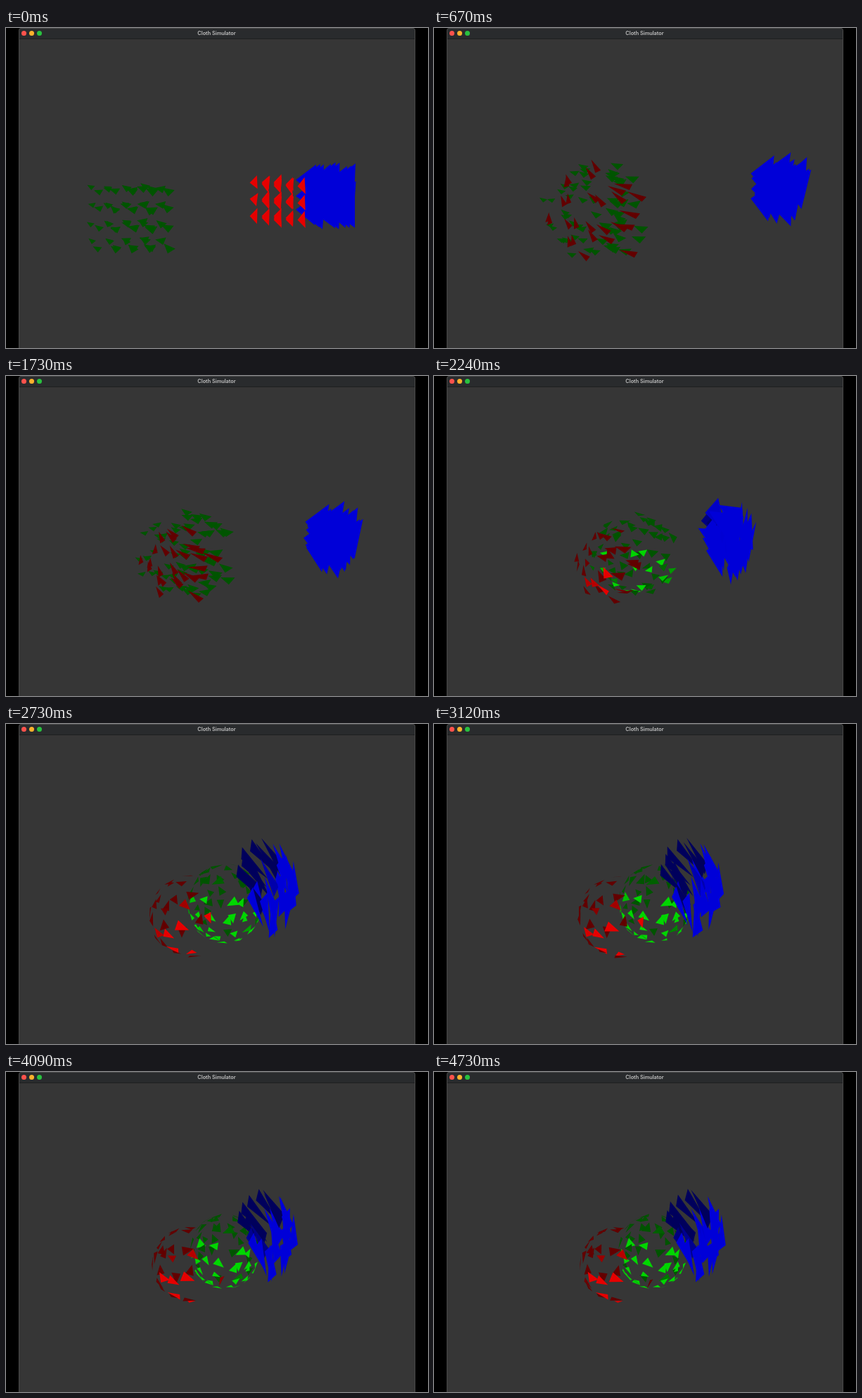
Write an HTML page with a canvas that moves like this. It is 600x456 px and loops after 4.76 s.

```html
<!DOCTYPE html>
<html lang="en">
<head>
<meta charset="utf-8">
<title>Cloth Simulator</title>
<style>
  html, body { margin: 0; width: 100%; height: 100%; overflow: hidden; background: #000; }
  .window {
    position: absolute; left: 18px; top: 0; width: 564px; height: 456px;
    box-sizing: border-box; border: 1px solid #494949; border-bottom: 0;
    border-radius: 4px 4px 0 0; background: #363636; overflow: hidden;
  }
  .bar {
    position: relative; height: 14px; background: #292b2d; border-bottom: 1px solid #1e1f20;
    font: 600 7.3px/13px Inter, sans-serif; color: #c2c2c2; text-align: center; text-indent: -1px;
  }
  .bar i { position: absolute; top: 3px; width: 7px; height: 7px; border-radius: 50%; }
  canvas { position: absolute; left: 0; top: 0; }
</style>
</head>
<body>
<div class="window">
  <div class="bar">
    <i style="left:3px;background:#ff524c"></i>
    <i style="left:14px;background:#fbb12c"></i>
    <i style="left:25px;background:#29c13f"></i>
    Cloth Simulator
  </div>
</div>
<canvas id="stage" width="600" height="456"></canvas>
<script>
const ctx = document.getElementById('stage').getContext('2d');
const LOOP = 4760, STEP = 30;
const TIMES = [0, 670, 1730, 2730, 3520, 4090, 4730];
// Yaw and scale of the flocks once they have settled
const VIEWS = [[1.3, 1.07], [1.5, 1.02], [1.6, 1], [1.65, 1]];

// Triangles as x, y pairs in a unit box
const DOWN = [-1, -.7, 1, -.5, .1, 1];
const LEFT = [-1, 0, .7, -1, .6, 1];
const WEDGE = [-1, -.7, 1, -.1, .6, 1];
const DART = [0, -1, 1, .6, -.6, 1];
const TANGENT = [1.1, 0, -.7, .75, -.7, -.75];

let seed = 7;
const rand = () => {
  seed = (seed + 0x6D2B79F5) | 0;
  let r = Math.imul(seed ^ (seed >>> 15), 1 | seed);
  r = (r + Math.imul(r ^ (r >>> 7), 61 | r)) ^ r;
  return ((r ^ (r >>> 14)) >>> 0) / 4294967296;
};
const jit = a => (rand() * 2 - 1) * a;
const clamp = a => Math.min(1, Math.max(0, a));

const unit = v => { const l = Math.hypot(...v) || 1; return v.map(a => a / l); };
const cross = (a, b) => [a[1]*b[2] - a[2]*b[1], a[2]*b[0] - a[0]*b[2], a[0]*b[1] - a[1]*b[0]];
const spin = ([x, y, z], yaw, pitch = .4) => {
  const c = Math.cos(yaw), s = Math.sin(yaw), p = Math.cos(pitch), q = Math.sin(pitch);
  const z1 = z * c - x * s;
  return [x * c + z * s, y * p - z1 * q, y * q + z1 * p];
};

const flat = (shape, x, y, w, h, turn = 0) => {
  const c = Math.cos(turn), s = Math.sin(turn), out = [];
  for (let i = 0; i < 6; i += 2) {
    const a = shape[i] * w, b = shape[i + 1] * h;
    out.push(x + a * c - b * s, y + a * s + b * c);
  }
  return out;
};

// Triangle lying on a sphere
const shell = (dir, heading, cx, cy, rx, ry, size) => {
  const a = unit(cross(dir, [.3, 1, .2])), b = cross(dir, a);
  const t = flat(TANGENT, 0, 0, size, size, heading), out = [];
  for (let i = 0; i < 6; i += 2) {
    out.push(cx + dir[0] * rx + a[0] * t[i] + b[0] * t[i + 1],
             cy + dir[1] * ry + a[1] * t[i] + b[1] * t[i + 1]);
  }
  return out;
};

// Cell of a cube of boids, with its direction from the middle
const cell = (n, side) => {
  const i = n % side, j = Math.floor(n / side) % side, k = Math.floor(n / side / side);
  const v = [i, j, k].map(a => a * 2 / (side - 1) - 1 + jit(.22));
  return { i, j, k, dir: unit(v), heading: rand() * 6.28, reach: .4 + .6 * Math.sqrt(rand()) };
};

function greenBoid(n) {
  const { i, j, k, dir, heading, reach } = cell(n, 4);
  const near = k % 2, size = 6 + rand() * 3.5, w0 = 5.5 + i * .8 + near;
  const x0 = 121 + 25 * (i + (k >> 1)) + 10 * near, y0 = 228 + 25 * j + near * (4 + 2.3 * j);
  const poses = [flat(DOWN, x0 + jit(2), y0 + jit(2), w0, w0 * .75, jit(.35))], lit = [0, 0, 0];
  const ball = (cx, cy, rx, ry, yaw) => {
    const d = spin(dir, yaw), w = 8 + d[0] * 2.5;
    poses.push(flat(DOWN, cx + d[0] * rx * reach, cy + d[1] * ry * reach, w, w * .62, jit(.3)));
  };
  ball(228, 264, 78, 78, .2);
  ball(255, 256, 72, 71, .8);
  for (const [yaw, scale] of VIEWS) {
    const d = spin(dir, yaw);
    poses.push(shell(d, heading, 311, 256, 49 * scale, 53 * scale, size));
    lit.push(clamp((d[1] * .75 + d[2] * .65 - .1) * 6));
  }
  return { poses, lit };
}

function redBoid(n) {
  const { i, j, k, dir, heading, reach } = cell(n, 3);
  const size = 7 + rand() * 4;
  const poses = [flat(LEFT, 353 + 17 * (i + k), 220 + 24 * j + k * 2.5, 6.5, 11 + jit(1.5), jit(.1))];
  const lit = [1, 0, 0];
  const ball = (cx, cy, rx, ry, yaw) => {
    const d = spin(dir, yaw), w = 10 + d[0] * 5;
    poses.push(flat(WEDGE, cx + d[0] * rx * reach, cy + d[1] * ry * reach, w, 7, .4 - d[0] * .5 + jit(.3)));
  };
  ball(226, 264, 80, 76, .2);
  ball(243, 267, 56, 55, .7);
  for (const [yaw, scale] of VIEWS) {
    const d = spin(dir, yaw), side = unit([d[0] * .7 - .45, d[1], d[2]]);
    poses.push(shell(side, heading, 262, 274, 54 * scale, 54 * scale, size));
    lit.push(clamp((side[1] * .5 + side[2] * .7 - .45) * 6));
  }
  return { poses, lit };
}

function blueBoid(n) {
  const { i, j, k, dir, heading, reach } = cell(n, 3);
  const half = heading > 3.14 ? Math.PI : 0;
  const poses = [flat(LEFT, 429 + 22 * i + 6 * k, 216 + 23 * j + jit(3), 17, 22, jit(.06))];
  const lit = [1, 1, 1];
  const ball = (cx, cy, rx, ry, yaw) => {
    const d = spin(dir, yaw, .15);
    poses.push(flat(LEFT, cx + d[0] * rx * reach, cy + d[1] * ry * reach, 18, 29, .12 + jit(.12)));
  };
  ball(492, 228, 34, 28, .2);
  ball(463, 231, 32, 30, .5);
  for (const [yaw, scale] of VIEWS) {
    const d = spin(dir, yaw);
    const side = -d[0] * .6 - d[1] * .55;
    const x = 377 + (d[0] * 31 + d[1] * 4) * scale, y = 231 + d[1] * 43 * scale;
    poses.push(flat(DART, x, y, 8, 27 * scale, half - .3 - .6 * side));
    lit.push(clamp((.3 - side) * 6));
  }
  return { poses, lit };
}

// Reorder corners so that a triangle turns as little as possible between poses
const ORDERS = [[0, 1, 2], [1, 2, 0], [2, 0, 1], [0, 2, 1], [2, 1, 0], [1, 0, 2]];
const align = (prev, tri) => {
  const mean = (p, c) => (p[c] + p[c + 2] + p[c + 4]) / 3;
  const dx = mean(prev, 0) - mean(tri, 0), dy = mean(prev, 1) - mean(tri, 1);
  const cost = p => p.reduce((sum, a, c) => sum + (a + (c % 2 ? dy : dx) - prev[c]) ** 2, 0);
  return ORDERS.map(o => o.flatMap(c => [tri[c * 2], tri[c * 2 + 1]]))
    .reduce((best, p) => cost(p) < cost(best) ? p : best);
};

const flock = (count, make, dark, bright) => ({
  dark, bright,
  boids: Array.from({ length: count }, (_, n) => {
    const { poses, lit } = make(n);
    for (let k = 1; k < poses.length; k++) poses[k] = align(poses[k - 1], poses[k]);
    return { poses, lit, flip: .2 + rand() * .6 };
  })
});
const FLOCKS = [
  flock(64, greenBoid, [0, 84, 0], [0, 214, 0]),
  flock(27, blueBoid, [0, 0, 92], [0, 0, 216]),
  flock(27, redBoid, [98, 0, 0], [230, 0, 0])
];

const slope = (poses, k, c) => {
  const a = Math.max(0, k - 1), b = Math.min(TIMES.length - 1, k + 1);
  return (poses[b][c] - poses[a][c]) / (TIMES[b] - TIMES[a]);
};

function draw(t) {
  let k = 0;
  while (k < TIMES.length - 2 && t >= TIMES[k + 1]) k++;
  const span = TIMES[k + 1] - TIMES[k];
  const u = Math.min(1, (t - TIMES[k]) / span), v = 1 - u;
  const h0 = (1 + 2 * u) * v * v, h1 = u * v * v * span;
  const h2 = u * u * (3 - 2 * u), h3 = -u * u * v * span;
  ctx.clearRect(0, 0, 600, 456);
  for (const { boids, dark, bright } of FLOCKS) {
    for (const { poses, lit, flip } of boids) {
      const p = poses[k].map((a, c) =>
        a * h0 + slope(poses, k, c) * h1 + poses[k + 1][c] * h2 + slope(poses, k + 1, c) * h3);
      const light = lit[k] + (lit[k + 1] - lit[k]) * clamp((u - flip) * 5 + .5);
      ctx.fillStyle = `rgb(${dark.map((a, c) => Math.round(a + (bright[c] - a) * light))})`;
      ctx.beginPath();
      ctx.moveTo(p[0], p[1]);
      ctx.lineTo(p[2], p[3]);
      ctx.lineTo(p[4], p[5]);
      ctx.fill();
    }
  }
}

const start = performance.now();
function tick() {
  const t = (performance.now() - start) % LOOP;
  draw(Math.floor(t / STEP) * STEP);
  requestAnimationFrame(tick);
}
tick();
</script>
</body>
</html>
```
